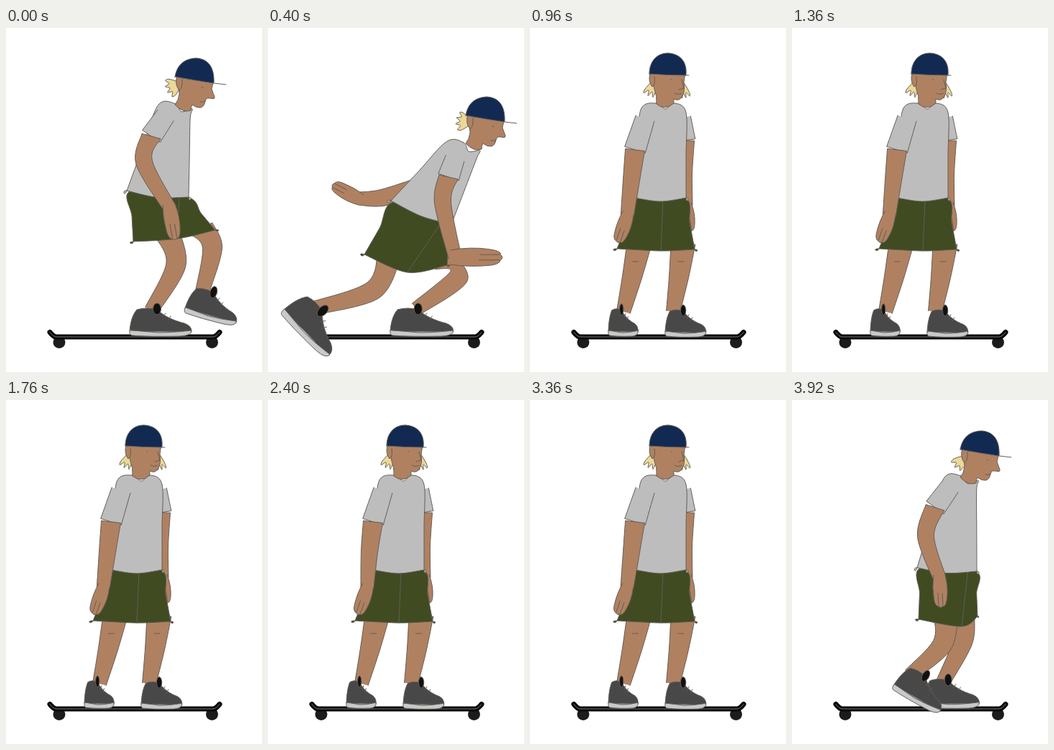
An HTML page for the animation above (4 s loop, 356 by 480 pixels).

```html
<!DOCTYPE html>
<html lang="en">
<head>
<meta charset="utf-8">
<title>Skater</title>
<style>
  html, body { margin: 0; width: 100%; height: 100%; overflow: hidden; background: #fff; }
  svg { display: block; width: 356px; height: 480px; }
  path, ellipse { stroke: #635d57; stroke-width: 1; stroke-linejoin: round; stroke-linecap: round; vector-effect: non-scaling-stroke; }
  .board path { fill: none; stroke: #080808; stroke-width: 7; }
  .board path + path { stroke: #777; stroke-width: 1; }
  .board circle { fill: #1c1c1c; }
</style>
</head>
<body>
<svg id="stage" viewBox="0 0 356 480">
  <g class="board">
    <circle cx="74" cy="438.5" r="8.5"/><circle cx="286.5" cy="438.5" r="8.5"/>
    <path d="M61 424.500Q66 431 70 431H288Q292 431 297 424.500"/>
    <path d="M61 424.500Q66 431 70 431H288Q292 431 297 424.500"/>
  </g>
</svg>
<script>
const stage = document.getElementById('stage');
const STEP = 80, COUNT = 50;
const SKIN = '#b08161', GREY = '#bdbdbd', GREEN = '#404b22', HAIR = '#ecd897',
      NAVY = '#122a52', SHOE = '#484848', SOLE = '#c9c9c9';

// head: x, y, turn to viewer, hair angle.  neck: x, y, tilt.  hem: back, front.
// cuffs: back, middle, front.  arms: shoulder, sleeve end, elbow, wrist, fingertip.
// legs: hip, knee, ankle.  shoes: heel x, y, angle, length, height.
const reach = {
  head: [262, 75, 0, 205], neck: [246, 111, 17], hem: [168, 227, 254, 236],
  cuffs: [177, 298, 238, 294, 291, 282],
  arm: [222, 122, 202, 151, 192, 187, 227, 250, 235, 295],
  farArm: [240, 125, 236, 150, 232, 180, 233, 210, 238, 230],
  leg: [272, 280, 287, 307, 273, 368], farLeg: [226, 290, 236, 332, 202, 394],
  shoe: [247, 398, 15, 0.86, 1.03], farShoe: [172, 430, 0, 1, 1]
};
const push = {
  head: [302, 129, 0, 235], neck: [282, 167, 26], hem: [171, 241, 255, 274],
  cuffs: [134, 316, 194, 341, 249, 331],
  arm: [260, 182, 251, 208, 243, 243, 260, 320, 325, 320],
  farArm: [240, 200, 212, 222, 158, 237, 126, 238, 90, 219],
  leg: [168, 318, 146, 366, 64, 391], farLeg: [245, 325, 265, 347, 206, 392],
  shoe: [16, 399, 45, 1.04, 1.2], farShoe: [170, 430, 0, 1.02, 1]
};
const stand = {
  head: [192, 68, 1, 180], neck: [188, 107, 0], hem: [146, 237, 217, 237],
  cuffs: [121, 308, 182, 311, 229, 309],
  arm: [160, 126, 146, 170, 141, 212, 135, 262, 122, 299],
  farArm: [210, 125, 215, 157, 214, 205, 217, 248, 222, 284],
  leg: [152, 300, 142, 347, 130, 396], farLeg: [213, 300, 207, 347, 199, 396],
  shoe: [109, 430, 0, 0.48, 0.98], farShoe: [188, 431, 0, 0.66, 0.97]
};
const crouch = {
  head: [261, 76, 0, 170], neck: [246, 111, 15], hem: [174, 234, 257, 239],
  cuffs: [176, 306, 236, 316, 258, 302],
  arm: [220, 121, 199, 150, 186, 190, 205, 248, 207, 289],
  farArm: [240, 125, 236, 150, 232, 180, 233, 210, 238, 230],
  leg: [214, 305, 208, 343, 164, 384], farLeg: [237, 305, 237, 338, 210, 394],
  shoe: [138, 404, 29, 0.86, 1.05], farShoe: [183, 430, 0, 0.9, 1.04]
};

const smooth = u => (1 - Math.cos(Math.PI * u)) / 2;
const settle = u => 1 - (1 - u) ** 2;
const track = [
  { at: 0, pose: reach, ease: smooth }, { at: 5, pose: push, ease: settle },
  { at: 8, pose: stand, ease: smooth }, { at: 42, pose: stand, ease: smooth },
  { at: 49, pose: crouch, ease: smooth }, { at: COUNT, pose: crouch }
];

const lerp = (a, b, u) => a.map((v, i) => v + (b[i] - v) * u);
const pairs = v => Array.from({ length: v.length / 2 }, (_, i) => [v[2 * i], v[2 * i + 1]]);
const rad = deg => deg * Math.PI / 180;

function mix(p, q, u) {
  const out = {};
  for (const key in p) out[key] = lerp(p[key], q[key], u);
  return out;
}

function poseAt(n) {
  const i = track.findLastIndex(k => k.at <= n), from = track[i], to = track[i + 1];
  const p = mix(from.pose, to.pose, from.ease((n - from.at) / (to.at - from.at)));
  if (from.pose === to.pose && from.pose === stand) {
    const sway = (1 + Math.cos(rad(72 * n))) / 2;
    p.head[0] -= sway;
    p.arm[6] += 3 * sway;
    p.arm[8] += 3 * sway;
  }
  if (from.pose === reach) {
    const dip = 18 * Math.sin(Math.PI * n / 5);
    p.leg[5] += dip;
    p.shoe[1] += dip;
  }
  return p;
}

// Smooth curve through points.
function curve(pts, closed) {
  const n = pts.length;
  const at = i => pts[closed ? (i + n) % n : Math.max(0, Math.min(n - 1, i))];
  let d = 'M' + at(0);
  for (let i = 0; i < (closed ? n : n - 1); i++) {
    const [a, b, c, e] = [at(i - 1), at(i), at(i + 1), at(i + 2)];
    d += `C${b.map((q, j) => q + (c[j] - a[j]) / 6)} ${c.map((q, j) => q - (e[j] - b[j]) / 6)} ${c}`;
  }
  return closed ? d + 'Z' : d;
}

// Limb around a chain of joints; the first or the last end gets an edge.
function tube(joints, widths, edgeAtEnd) {
  const last = joints.length - 1;
  const side = s => joints.map(([x, y], i) => {
    const a = joints[Math.max(0, i - 1)], b = joints[Math.min(last, i + 1)];
    const dx = b[0] - a[0], dy = b[1] - a[1], k = s * widths[i] / 2 / Math.hypot(dx, dy);
    return [x - dy * k, y + dx * k];
  });
  const left = side(1), right = side(-1);
  if (edgeAtEnd) right.reverse(); else left.reverse();
  return curve(left) + curve(right).replace('M', 'L');
}

// Tuft of locks around a point.
function tuft(x, y, from, span, size) {
  const pts = [[x, y]];
  for (let i = 0; i < 9; i++) {
    const a = rad(from - span * i / 8), r = size * (i % 2 ? 1 : 0.72);
    pts.push([x + r * Math.cos(a), y + r * Math.sin(a)]);
  }
  return curve(pts, true);
}

const updates = [];
function el(tag, attrs, parent = stage) {
  const node = document.createElementNS(stage.namespaceURI, tag);
  for (const key in attrs) node.setAttribute(key, attrs[key]);
  return parent.appendChild(node);
}
const draw = (fill, d, parent) => el('path', { fill, d }, parent);
function live(node, attr, rule) {
  updates.push(p => node.setAttribute(attr, rule(p)));
  return node;
}
const shape = (fill, rule, parent) => live(draw(fill, '', parent), 'd', rule);

function addArm(key) {
  shape(GREY, p => tube(pairs(p[key]).slice(0, 2), [27, 30], true));
  shape(SKIN, p => tube(pairs(p[key]).slice(1, 4), [27, 23, 18]));
  const hand = el('g', {});
  draw(SKIN, 'M-4-8Q14-12 30-9Q41-7 40-3Q43 0 40 3Q39 8 30 9Q12 11-4 8', hand);
  draw('none', 'M22-3L39-3M21 3L39 3', hand);
  live(hand, 'transform', p => {
    const [x, y, tx, ty] = p[key].slice(6), k = Math.hypot(tx - x, ty - y) / 41;
    const angle = Math.atan2(ty - y, tx - x) / rad(1);
    return `translate(${x} ${y}) rotate(${angle}) scale(${k} ${Math.sqrt(k)})`;
  });
}

function addLeg(leg, shoe) {
  shape(SKIN, p => tube(pairs(p[leg]), [34, 27, 19]));
  const crease = shape('none', p => {
    const [hip, knee] = pairs(p[leg]), [x, y] = lerp(hip, knee, 0.55);
    return `M${x - 4} ${y}h8`;
  });
  live(crease, 'stroke-opacity', p => p.head[2] > 0.9 ? 1 : 0);
  const g = el('g', {});
  draw(SHOE, 'M0-7C1-20 4-30 10-37Q24-41 38-37C48-28 60-22 76-18Q87-14 86-6Z', g);
  draw(SOLE, 'M0-8Q-1-2 3-1Q30 1 70 0Q87-1 86-8Q60-5 40-5Z', g);
  draw('none', 'M46-27l4-5M54-23l3-5', g);
  el('ellipse', { fill: '#111', cx: 38, cy: -38, rx: 5.5, ry: 8 }, g);
  live(g, 'transform', p => {
    const [x, y, a, w, h] = p[shoe];
    return `translate(${x} ${y}) rotate(${a}) scale(${w} ${h})`;
  });
}

function shorts(p) {
  const [hemBack, hemFront] = pairs(p.hem), [back, mid, front] = pairs(p.cuffs);
  const a = lerp(hemBack, hemFront, 0.06), b = lerp(hemBack, hemFront, 0.98);
  return curve([a, b, lerp(b, front, 0.5), front, front, mid, back, back, lerp(back, a, 0.5)], true);
}

function shirt(p) {
  const [x, y, tilt] = p.neck, [back, front] = pairs(p.hem);
  const c = Math.cos(rad(tilt)), s = Math.sin(rad(tilt));
  const near = (dx, dy) => [x + dx * c - dy * s, y + dx * s + dy * c];
  const left = near(-34, 7), right = near(14 + 15 * p.head[2], 11);
  const [mx, my] = lerp(back, front, 0.5);
  return curve([near(-12, -2), left, lerp(left, back, 0.5), back, back, [mx, my + 5],
    front, front, lerp(front, right, 0.5), right, near(13, -2), near(0, 6)], true);
}

// Head drawing with its own centre, shown on one side of the turn.
function addHead(cx, cy, facing) {
  const g = el('g', {});
  live(g, 'transform', p => `translate(${p.head[0] - cx} ${p.head[1] - cy})`);
  live(g, 'display', p => (p.head[2] > 0.5) === facing ? 'inline' : 'none');
  return g;
}

addArm('farArm');
addLeg('farLeg', 'farShoe');
addLeg('leg', 'shoe');
shape(GREEN, shorts);
shape('none', p => {
  const [back, front] = pairs(p.hem);
  return `M${lerp(back, front, 0.85 - 0.3 * p.head[2])}L${p.cuffs.slice(2, 4)}`;
});
shape(GREY, shirt);
addArm('arm');

const side = addHead(262, 75, false);
shape(HAIR, p => tuft(242, 78, p.head[3], 95, 21), side);
draw(SKIN, 'M239 70L241 92Q240 101 235 107Q246 119 257 115Q257 110 259 107Q265 112 271 111Q276 109 277 102L279 98H284Q291 100 290 96Q288 91 286 85L288 76Z', side);
draw(SKIN, 'M238 66Q234 79 241 87Q246 83 245 72', side);
draw(NAVY, 'M235 68C238 50 249 43 264 42C283 43 290 57 289 77Q262 73 235 68Z', side);
draw('none', 'M289 77L306 79M272 83h2M270 103Q274 104 277 102', side);

const quarter = addHead(192, 68, true);
draw(HAIR, tuft(175, 72, 140, 65, 25), quarter);
draw(HAIR, tuft(211, 74, 110, 55, 24), quarter);
draw(SKIN, 'M168 62L173 85Q177 95 176 106Q188 116 200 105V99Q208 103 212 95Q216 88 214 76L216 62Z', quarter);
draw(SKIN, 'M167 64Q164 74 170 82Q175 80 173 68', quarter);
draw(NAVY, 'M166 64C166 46 177 35 192 35C208 36 219 46 217 66Q192 66 166 64Z', quarter);
draw('none', 'M215 66H221M196 72h1M211 72L214 84L207 86M201 91Q207 94 211 91', quarter);

let shown = -1;
const start = performance.now();
function tick() {
  const n = Math.floor((performance.now() - start) / STEP) % COUNT;
  if (n !== shown) {
    shown = n;
    const p = poseAt(n);
    updates.forEach(update => update(p));
  }
  requestAnimationFrame(tick);
}
tick();
</script>
</body>
</html>
```
